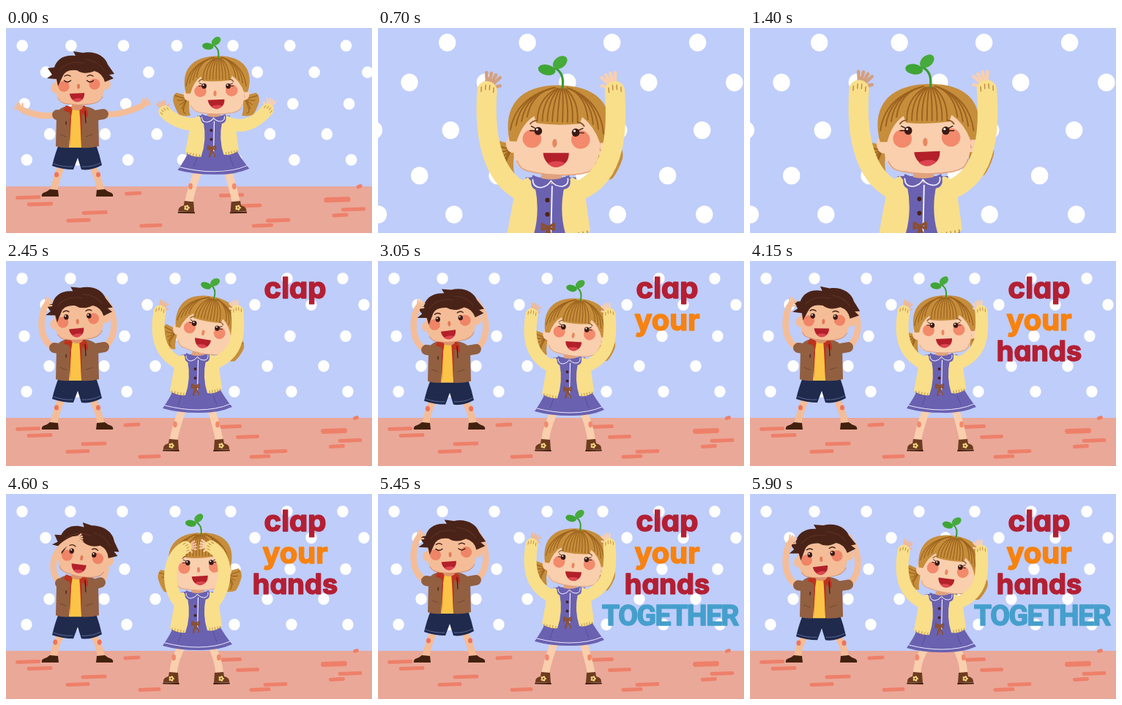
An HTML page with a canvas for the animation above (5950 ms loop, 500 by 281 pixels).

```html
<!DOCTYPE html>
<html lang="en">
<head>
<meta charset="utf-8">
<style>
html, body { margin: 0; width: 100%; height: 100%; overflow: hidden; background: #bfcdfa; }
canvas, svg { position: absolute; left: 0; top: 0; width: 500px; height: 281px; }
text { font: 700 40px Inter, sans-serif; font-feature-settings: "cv11"; text-anchor: middle;
  stroke-width: 1.6; stroke-linejoin: round; paint-order: stroke; visibility: hidden; }
.red { fill: #b41f33; stroke: #b41f33; }
.orange { fill: #f7820f; stroke: #f7820f; }
.blue { fill: #459fcc; stroke: #459fcc; font: 700 39px Roboto, sans-serif; letter-spacing: -1.5px; }
</style>
</head>
<body>
<canvas width="500" height="281"></canvas>
<svg viewBox="0 0 500 281">
  <text class="red" x="395" y="51" data-from="2450">clap</text>
  <text class="orange" x="395" y="95" data-from="2850">your</text>
  <text class="red" x="395" y="137" data-from="3150" style="font-size:38px">hands</text>
  <text class="blue" x="399" y="180" data-from="5050">TOGETHER</text>
</svg>
<script>
const c = document.querySelector('canvas').getContext('2d');
const words = [...document.querySelectorAll('text')];
const LOOP = 5950, CLOSE_UP = 400, DUET = 2450;
const SKIN = '#f9cfae', TAN = '#f4bd97', BLUSH = '#f28a6b', YELLOW = '#f9df8a', PURPLE = '#6a61b0',
  BROWN = '#925f41', DARK = '#4a2318', LIPS = '#b3202a', GOLD = '#c68d3b', STRAND = '#9a621f';

c.lineCap = c.lineJoin = 'round';
const fill = (d, color) => { c.fillStyle = color; c.fill(new Path2D(d)); };
const line = (d, color, w) => { c.strokeStyle = color; c.lineWidth = w; c.stroke(new Path2D(d)); };
const oval = (x, y, rx, ry, color, turn = 0) => {
  c.fillStyle = color;
  c.beginPath();
  c.ellipse(x, y, rx, ry, turn, 0, 7);
  c.fill();
};
const at = (x, y, deg, sx, sy, draw) => {
  c.save();
  c.translate(x, y);
  c.rotate(deg * Math.PI / 180);
  c.scale(sx, sy);
  draw();
  c.restore();
};
const mix = (a, b, k) => a.map((v, i) => v + (b[i] - v) * k);

// Eased value between [time, value] keys
function key(t, keys) {
  const i = keys.findIndex(k => k[0] > t);
  if (i < 0) return keys[keys.length - 1][1];
  if (!i) return keys[0][1];
  const [t0, a] = keys[i - 1], [t1, b] = keys[i];
  const k = (t - t0) / (t1 - t0);
  return a + (b - a) * k * k * (3 - 2 * k);
}

const DOTS = [
  [24, [22, 88, 159, 231, 307, 384, 460]],
  [60, [54, 125, 193, 267, 340, 417, 489]],
  [103, [25, 93, 162, 238, 313, 388, 464]],
  [144, [59, 134, 204, 282, 357, 434]],
  [179, [28, 97, 165, 239, 312, 390, 467]]
];
const BRICKS = [[30, 230, 34], [46, 239, 35], [172, 224.5, 23], [120, 250.5, 35], [98, 261, 33], [196, 268, 31],
  [305, 227, 34], [330, 241, 32], [448, 233, 36], [470, 246, 33], [452, 254, 22], [368, 261, 33], [347, 268, 29], [478, 215, 8]];

function wall() {
  for (const [y, xs] of DOTS) for (const x of xs) oval(x, y, 7.7, 8, '#fff');
}
function floor() {
  c.fillStyle = '#eaa898';
  c.fillRect(0, 215, 510, 80);
  for (const [x, y, w] of BRICKS) {
    const r = w > 35 ? 3.5 : 2.5;
    line(`M${x - w / 2 + r} ${y + 0.5}L${x + w / 2 - r} ${y - 0.5}`, '#ee806a', r * 2);
  }
}

const curve = p => `M${p[0]} ${p[1]}C${p.slice(2).join(' ')}`;
const endAngle = p => Math.atan2(p[6] - p[4], p[5] - p[7]) * 180 / Math.PI;

function hand(p, side, size, color, lean) {
  at(p[6], p[7], endAngle(p) + side * lean, size * side, size, () => {
    oval(0, -5, 5, 6.5, color);
    for (let i = 0; i < 4; i++) line(`M${-3 + 2 * i} -8L${-6 + 4.2 * i} ${-16.5 + Math.abs(i - 1.4)}`, color, 2.9);
    line('M3 -4L9 -8', color, 3);
  });
}

function smile() {
  fill('M-11 -19L11 -20C12 -4 -9 -3 -11 -19Z', LIPS);
  fill('M-7 -10Q1 -14 8 -11Q1 -3 -7 -10Z', '#dd4650');
}

function girlHead() {
  for (const s of [-1, 1]) at(0, 0, 0, s, 1, () => {
    fill('M34 -24L53 -29Q58 -25 57 -17Q54 -6 49 1Q42 4 34 2Q38 -8 34 -24Z', GOLD);
    for (let i = 0; i < 5; i++) line(`M38 -21Q47 ${-22 + i * 5} ${55 - i * 3.5} ${-25 + i * 6}`, STRAND, 1.2);
  });
  oval(-37, -26, 6, 8, SKIN);
  oval(38, -27, 6, 8, SKIN);
  line('M38 -31Q35 -27 38 -23', '#e59a76', 1);
  const face = 'M-36 -40C-38 -10 -35 -4 -20 -2Q0 2 22 -2C36 -5 38 -15 37 -40L20 -62L-20 -62Z';
  fill(face, SKIN);
  line('M-33 -11C-30 -4 -26 -3 -20 -2Q0 2 22 -2C30 -4 33 -6 35 -13', '#e3a07c', 1);
  fill('M-40 -28C-48 -60 -32 -79 3 -79C38 -79 50 -58 42 -30L37 -30Q32 -44 21 -52L19 -46Q0 -43 -18 -45L-20 -51Q-30 -44 -34 -28Z', GOLD);
  for (let i = -4; i < 5; i++) line(`M${2 + i} -76Q${i * 4.4} -66 ${i * 4.3} -47`, STRAND, 1.2);
  for (const s of [-1, 1]) for (let i = 0; i < 4; i++)
    line(`M${2 + s * (5 + i)} ${-77 + i * 0.3}Q${s * (23 + i * 4.5)} ${-72 + i * 2} ${s * (26 + i * 4.6)} ${-50 + i * 4}`, STRAND, 1.2);
  oval(-21, -31, 8, 8, BLUSH);
  oval(20.5, -32, 8, 8, BLUSH);
  for (const [x, s] of [[-16, -1], [16, 1]]) {
    oval(x, -38, 3.3, 3.6, '#3a1a14');
    oval(x - 1, -39.4, 1, 1, '#fff');
    line(`M${x + s * 2} -40l${s * 4} -2M${x + s * 3} -38l${s * 4} 0`, '#3a1a14', 0.9);
    line(`M${x + s * 2} -47q${s * 3} 0 ${s * 5} 3`, '#8a5526', 1.2);
  }
  oval(-1.5, -28, 2, 3.8, '#e88860');
  smile();
  line('M3 -77C4 -87 1 -91 -4 -94', '#3a9a32', 2);
  oval(-11, -92, 7.5, 4.6, '#3fa535', 0.15);
  oval(0, -99, 7, 4.8, '#46ab3a', -0.75);
}

const GIRL_ARMS = {
  wide: [[238, 140, 224, 141, 206, 134, 197, 123], [286, 140, 307, 146, 324, 131, 333, 120]],
  up: [[238, 141, 207, 126, 205, 98, 210, 69], [285, 140, 319, 126, 318, 98, 316, 69]],
  clap: [[239, 145, 217, 122, 221, 80, 245, 67], [284, 143, 303, 118, 304, 80, 280, 66]]
};

function girl({ tilt, drop, arms, lift = 0, leftHand = '#efb898' }) {
  const feet = [[228, -1], [292, 1]];
  for (const [x, s] of feet) {
    const hip = 261 + s * 18, bend = s * drop * 0.5;
    line(`M${hip} ${198 + drop}Q${x - s * 5 + bend} 224 ${x} 248`, SKIN, 10.5);
    oval(x - s * 3 + bend * 0.6, 224, 2.8, 4.2, BLUSH);
    at(x, 0, 0, s, 1, () => {
      fill('M-7 245L5 244L6 250Q14 252 13 258L-8 259Z', '#6d3c20');
      line('M-8 260L13 259.5', '#40210f', 1.8);
    });
    for (let a = 0; a < 5; a++) oval(x + s * 2 + 2.4 * Math.cos(a * 1.257), 253 + 2.4 * Math.sin(a * 1.257), 1.5, 1.5, '#f6d780');
  }
  c.save();
  c.translate(0, drop);
  fill('M240 128L283 128L290 172Q299 188 309 200Q289 209 262 208Q235 208 214 202Q225 186 231 172Z', PURPLE);
  line('M217 198Q240 204 262 204Q288 204 306 196', '#ecebff', 1);
  line('M240 184l-5 14M283 184l5 13', '#574e9c', 1);
  line('M262.5 136L261.5 182', '#f4f2ff', 1.2);
  fill('M242 128Q232 132 230 145L224 178Q234 185 245 184Q253 162 248 136Z', YELLOW);
  fill('M279 128Q291 131 291 145L295 175Q286 183 275 181Q268 160 273 136Z', YELLOW);
  for (let i = 0; i < 5; i++) line(`M${227 + i * 4} ${178 + i * 0.8}l-.6 3.4M${278 + i * 3.6} ${178 - i * 0.7}l.6 3`, '#b98a45', 0.9);
  oval(258.5, 148, 1.9, 2, DARK);
  oval(258.5, 160.5, 1.9, 2, DARK);
  line('M259 172l-5 -3v5zl5 -3v5zM259 173l-3 11M259 173l4 10', '#8a5030', 2.2);
  oval(262, 128, 9, 6, '#e0a27d');
  fill('M246 126Q241 139 253 140Q260 139 262 132Q265 139 271 139Q281 138 277 126Q262 134 246 126Z', PURPLE);
  line('M246 130Q246 137 253 137Q259 136 261.5 131Q265 136 271 136Q277 135 276 129', '#f4f2ff', 1);

  at(265, 126, tilt, 1, 1, girlHead);
  arms.forEach((arm, i) => {
    const p = arm.map((v, n) => n === 7 || n === 5 ? v - lift : n === 6 && lift ? v + (i ? 0 : -3) : v);
    const side = i ? -1 : 1;
    hand(p, side, 0.92 + lift * 0.004, i ? SKIN : leftHand, 16);
    line(curve(p), YELLOW, 17);
    at(p[6], p[7], endAngle(p), 1, 1, () => line('M-5 -3v4M-1.5 -5v4M2 -5v4M5.5 -3v4', '#c08a45', 0.9));
  });
  c.restore();
}

function boyHead(shut) {
  oval(-32, -23, 5.5, 7, TAN);
  oval(38, -28, 6, 7.5, TAN);
  fill('M-31 -40C-33 -10 -28 -3 -15 -1Q0 2 17 -1C33 -4 37 -15 36 -38L30 -54L-25 -54Z', TAN);
  line('M-28 -9C-25 -3 -21 -2 -15 -1Q0 2 17 -1C25 -2 30 -5 33 -11', '#d98e68', 1);
  oval(-20, -25, 7.6, 7.6, '#ef8466');
  oval(22, -28, 7.6, 7.6, '#ef8466');
  fill('M-28 -25L-30 -35L-43 -36L-36 -41L-42 -50L-33 -51C-30 -62 -20 -69 -4 -67L-7 -73L6 -71C22 -74 36 -67 40 -55L49 -42L42 -41L48 -36L36 -31Q33 -43 22 -46Q8 -40 -2 -47Q-18 -49 -22 -38Z', DARK);
  line('M-26 -48Q-12 -62 8 -57M10 -62Q26 -60 35 -48', '#5f3223', 1);
  for (const x of [-15, 16]) {
    if (shut) line(`M${x - 4.5} -33q4.5 4 9 0`, '#3a1a14', 1.4);
    else {
      oval(x, -32, 3.2, 3.6, '#3a1a14');
      oval(x - 1, -33.4, 1, 1, '#fff');
    }
    line(`M${x - 4} -39q4 -3 8 0`, DARK, 1.4);
  }
  oval(0, -25, 2, 3.6, '#e27a55');
  at(-2, 3, 0, 0.92, 0.95, smile);
}

const BOY_ARMS = {
  wide: [[70, 119, 55, 122, 40, 120, 24, 113], [133, 118, 150, 120, 170, 114, 185, 107]],
  up: [[66, 119, 47, 110, 45, 85, 53, 63], [134, 118, 151, 105, 150, 80, 141, 62]],
  clap: [[74, 118, 57, 100, 63, 70, 92, 58], [129, 117, 143, 100, 136, 75, 114, 56]]
};

function boyArm(p, side) {
  hand(p, side, 0.78, TAN, 10);
  line(curve(p), TAN, 8.5);
  line(`M${side > 0 ? 81 : 116} 121L${p[0]} ${p[1]}`, BROWN, 14);
}

function boy({ tilt, drop, arms, shut, rise = 0 }) {
  for (const [x, s] of [[65, -1], [130, 1]]) {
    const bend = s * drop * 0.4;
    line(`M${97 + s * 20} ${186 + drop}Q${x - s * 4 + bend} 204 ${x} 224`, TAN, 9.5);
    oval(x - s * 4 + bend, 201 + drop * 0.5, 3, 3.6, '#ee7359');
    at(x, 0, 0, s, 1, () => fill('M-6 222L5 221Q8 224 14 226Q17 228 16 231L-7 231Z', '#42210f'));
  }
  c.save();
  c.translate(0, drop);
  boyArm(arms[1], -1);
  fill('M72 160L123 160Q128 174 131 188Q116 196 103 194L98 178L92 194Q77 194 63 189Q67 172 72 160Z', '#1f2a4d');
  line('M65 186Q78 191 91 190M104 190Q118 191 129 185', '#5a6793', 1);
  fill('M84 108L106 108L103 164L86 164Z', '#fbc447');
  fill('M84 107Q70 109 69 121L68 162Q76 165 86 164L89 122Z', BROWN);
  fill('M105 107Q124 109 126 120L127 162Q116 165 103 164L102 122Z', BROWN);
  fill('M82 106Q76 116 79 122L87 117L87 162L89 122L91 109Z', '#bd3320');
  fill('M107 106Q114 115 111 123L104 117L103 162L101 122L100 109Z', '#bd3320');
  line('M83 114L82 132M108 114L109 130', '#2d1710', 1.1);
  line('M74 146l8 3M109 149l9 -3', '#74472f', 1);
  oval(97, 108, 8, 5, '#dc936c');
  at(99, 108 - rise, tilt, 1, 1, () => boyHead(shut));
  boyArm(arms[0], 1);
  c.restore();
}

function draw() {
  const t = Math.floor(performance.now() % LOOP / 50) * 50;
  const clap = key(t % 600, [[0, 0], [200, 0], [290, 1], [400, 1], [490, 0], [600, 0]]);
  const pose = set => set.up.map((p, i) => mix(p, set.clap[i], clap));

  c.fillStyle = '#bfcdfa';
  c.fillRect(0, 0, 500, 281);

  if (t < CLOSE_UP) {
    const swing = 1 - Math.cos(t / 250);
    at(0, 0, 0, 1.01, 1.01, () => { wall(); floor(); });
    boy({ tilt: swing * 2, drop: swing, arms: BOY_ARMS.wide, shut: t < 300, rise: 3 });
    at(284, 124, 0, 1.03, 1.01, () => {
      c.translate(-262, -132);
      girl({ tilt: swing * 3, drop: swing * 2, arms: GIRL_ARMS.wide });
    });
  } else if (t < DUET) {
    const beat = (t - 1400) / 600 * Math.PI;
    at(-147, -16.5, 0, 1.52, 1.52, wall);
    at(237, 200, 0, 1.6, 1.56, () => {
      c.translate(-262, -126);
      girl({
        tilt: 5 * Math.sin(beat), drop: 2 - 2 * Math.cos(beat * 2),
        arms: pose(GIRL_ARMS), lift: 17 * (1 - clap), leftHand: '#d3a081'
      });
    });
  } else {
    const drop = key(t, [[2450, 0], [2850, 8], [3250, 0], [3650, 8], [4125, 0], [4600, 6], [5000, 1], [5450, 0], [5900, 9]]);
    wall();
    floor();
    boy({
      tilt: key(t, [[2450, -3], [3650, -5], [4600, 10], [5450, -1], [5900, -4]]),
      drop: drop * 0.7, arms: pose(BOY_ARMS), shut: t >= 5350 && t < 5600
    });
    girl({ tilt: key(t, [[2450, 12], [3650, 1], [4600, -1], [5450, 6], [5900, 10]]), drop, arms: pose(GIRL_ARMS) });
  }

  for (const w of words) w.style.visibility = t >= +w.dataset.from ? 'visible' : 'hidden';
  requestAnimationFrame(draw);
}
draw();
</script>
</body>
</html>
```
